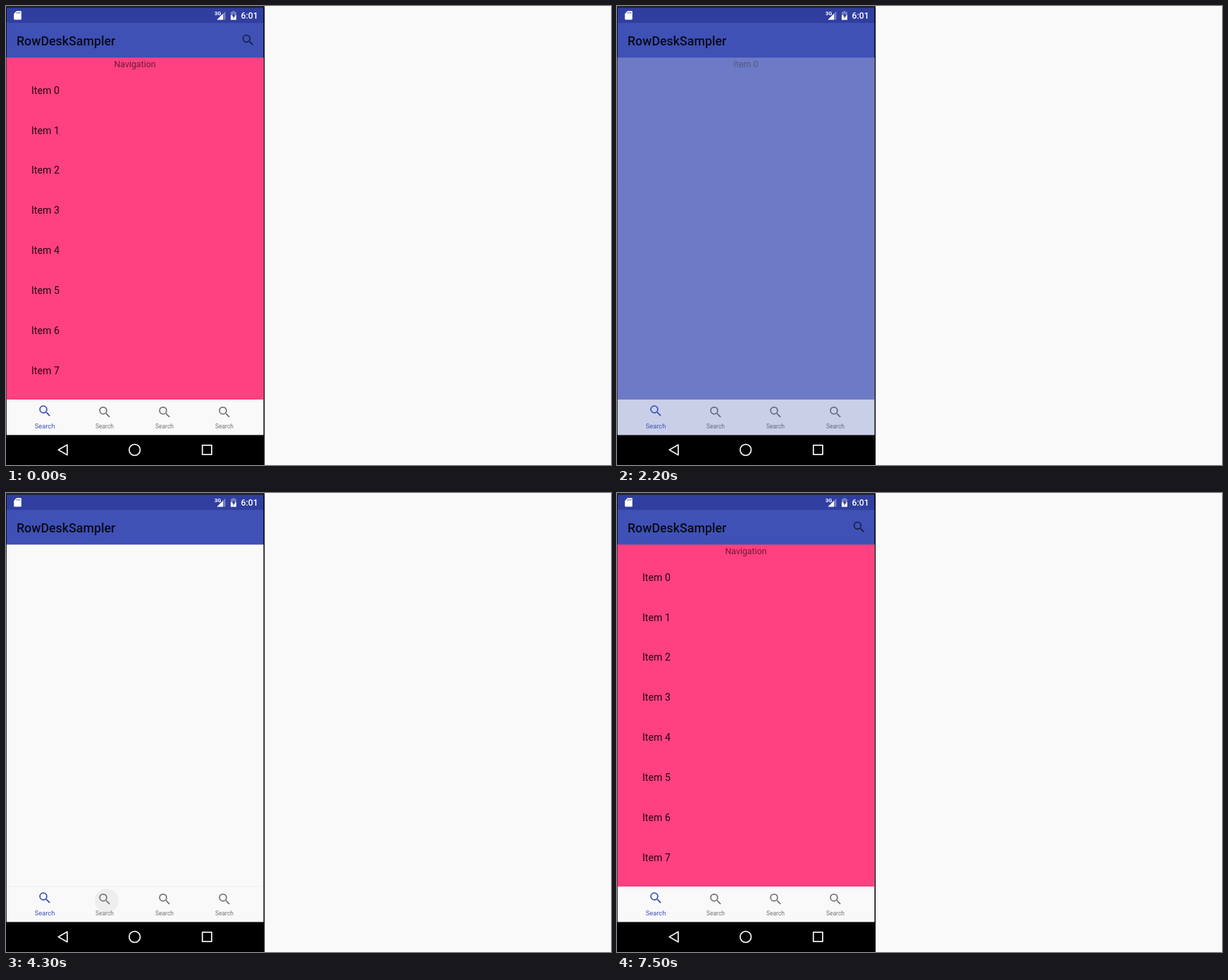
Recreate the animation shown at these times as an HTML page. Size 859x652 px, loop 8000 ms.

```html
<!DOCTYPE html>
<html lang="en">
<head>
<meta charset="utf-8">
<title>Two pane app</title>
<style>
  html, body { margin: 0; width: 100%; height: 100%; overflow: hidden; background: #f9f9f9; }
  svg { display: block; width: 859px; height: 652px; font-family: Roboto, sans-serif; }
  .mid { text-anchor: middle; }
  .item { font-size: 14.2px; fill: rgba(0, 0, 0, .87); }
  .small { font-size: 12.4px; fill: rgba(0, 0, 0, .58); }
  .tab { fill: #757575; font-size: 8.5px; }
  .tab.on { fill: #3f51b5; font-size: 9.3px; }
  .tab.on use { transform: translateY(-1.7px); }
</style>
</head>
<body>
<svg viewBox="0 0 859 652">
  <defs>
    <path id="lens" transform="scale(.888) translate(-11.75 -11.75)" d="M15.5 14h-.79l-.28-.27A6.47 6.47 0 0 0 16 9.5 6.5 6.5 0 1 0 9.5 16c1.61 0 3.09-.59 4.23-1.57l.27.28v.79l5 4.99L20.49 19zm-6 0a4.5 4.5 0 1 1 0-9 4.5 4.5 0 0 1 0 9z"/>
    <clipPath id="listClip"><rect x="1" y="91" width="364.6" height="468"/></clipPath>
    <clipPath id="tabsClip"><rect x="1" y="559" width="364.6" height="50"/></clipPath>
  </defs>

  <rect width="367.2" height="652"/>
  <rect width="367" height="2.5" fill="#252525"/>

  <!-- status bar -->
  <rect x=".8" y="2.5" width="364.8" height="21.5" fill="#303f9f"/>
  <g fill="#fff">
    <path d="M15 7h5.5q1.3 0 1.3 1.3v10q0 1.3-1.3 1.3h-8q-1.3 0-1.3-1.3V11z"/>
    <path d="M15.5 8.5v2.2M17.6 8.5v2.2M19.7 8.5v2.2" stroke="#303f9f" stroke-width=".9"/>
    <path d="M311.5 7.5v12h-12z" opacity=".35"/>
    <path d="M308 11v8.5h-8.5z"/>
    <text x="296" y="12.6" font-size="7.5" font-weight="700">3G</text>
    <path d="M321.5 7h3v1.4h2.5v11.2h-8V8.4h2.5z" opacity=".35"/>
    <path d="M319 13h8v6.6h-8z"/>
    <path d="M324 9.5l-3.2 4.9h1.8v3.6l3.2-4.9H324z" fill="#303f9f"/>
    <text x="333.5" y="18.2" font-size="12.4" font-weight="500">6:01</text>
  </g>

  <!-- list -->
  <rect x=".8" y="73" width="364.8" height="536.4" fill="#f9f9f9"/>
  <g id="page">
    <rect x=".8" y="73" width="364.8" height="486" fill="#ff4081"/>
    <text class="small mid" x="183" y="87">Navigation</text>
    <g clip-path="url(#listClip)">
      <rect id="press" x="1" y="91" width="365" height="57"/>
      <path id="glowTop" d="M1 91h365v17Q183 163 1 108z" fill="#3f51b5"/>
      <path id="glowEnd" d="M1 559h365v-12Q183 512 1 547z" fill="#3f51b5"/>
      <g id="list"></g>
    </g>
  </g>

  <!-- bottom tabs -->
  <rect x=".8" y="558.5" width="364.8" height="1" fill-opacity=".05"/>
  <g clip-path="url(#tabsClip)"><circle id="ripple" fill-opacity=".045"/></g>
  <g id="tabs"></g>

  <!-- detail pane -->
  <g id="detail">
    <rect x=".8" y="73" width="364.8" height="486" fill="#3f51b5"/>
    <text class="small mid" x="183" y="87">Item 0</text>
  </g>
  <rect id="shade" x=".8" y="559" width="364.8" height="50.4" fill="#3f51b5"/>

  <!-- toolbar -->
  <rect x=".8" y="24" width="364.8" height="49.3" fill="#3f51b5"/>
  <text x="15" y="55.5" font-size="17.8" font-weight="500" fill-opacity=".87">RowDeskSampler</text>
  <use id="toolIcon" href="#lens" transform="translate(343.5 48.3)" fill-opacity=".6"/>

  <g id="toast">
    <rect x="102.5" y="513" width="161" height="39" rx="19.5" fill="#555" fill-opacity=".9"/>
    <text class="mid" x="183" y="538" font-size="12.6" fill="#fff">Open not created yet</text>
  </g>

  <!-- system buttons -->
  <rect id="pill" x="41" y="609.5" width="79" height="42.5" rx="21" fill="#333"/>
  <g fill="none" stroke="#eee" stroke-width="1.8" stroke-linejoin="round">
    <path d="M74.3 630.5l12.6-7.3v14.6z"/>
    <circle cx="182.7" cy="630.5" r="7.8"/>
    <rect x="278.8" y="623.9" width="13.2" height="13.2"/>
  </g>
</svg>

<script>
const LOOP = 8000, STEP = 100;
const ROW = 56.83, TAB = 85;
const tapTimes = [4300, 5100, 6050, 7100];

const $ = id => document.getElementById(id);
const repeat = (n, make) => Array.from({ length: n }, (_, i) => make(i)).join('');
const tabX = i => 55 + TAB * i;

$('list').innerHTML = repeat(10, i => `<text class="item" x="36" y="${124.7 + i * ROW}">Item ${i}</text>`);
$('tabs').innerHTML = repeat(4, i =>
  `<g class="tab mid" transform="translate(${tabX(i)} 576.7)"><use href="#lens"/><text y="23.3">Search</text></g>`);
const tabs = [...$('tabs').children];

function set(id, attributes) {
  for (const name in attributes) $(id).setAttribute(name, attributes[name]);
}

function draw(t) {
  const ramp = (from, to) => Math.min(1, Math.max(0, (t - from) / (to - from)));
  const during = (from, to) => +(t >= from && t < to);
  const fade = (id, opacity) => set(id, { opacity });

  // Drag to the end of the list, then back past its start.
  const scroll = 100 * (ramp(400, 600) ** 2 - ramp(1000, 1300));
  set('list', { transform: `translate(0 ${-scroll})` });
  fade('glowEnd', .035 * during(600, 2000));
  fade('glowTop', during(1300, 2000) * (.12 - .075 * ramp(1300, 1400)));

  // Open the first item, then go back.
  const open = ramp(2000, 2400) - ramp(3200, 3600);
  fade('press', .1 * during(2000, 2100));
  fade('detail', 1 - (1 - open) ** 2);
  fade('shade', open ** 2);
  fade('pill', during(3200, 3700) * (1 - ramp(3300, 3700)));

  const listShown = 1 - during(2100, 3500) - during(4300, 6100);
  fade('page', listShown);
  fade('toolIcon', listShown);
  fade('toast', ramp(5000, 5600) - ramp(7000, 7500));

  // Each tap moves to the next tab once its ripple has grown.
  const selected = tapTimes.filter(tap => t >= tap + 50).length % tabs.length;
  tabs.forEach((tab, i) => tab.classList.toggle('on', i === selected));
  const last = tapTimes.findLastIndex(tap => tap <= t);
  const tap = tapTimes[last];
  const grow = ramp(tap, tap + 50);
  set('ripple', {
    cx: tabX((last + 1) % tabs.length) + 3 * (1 - grow),
    cy: 579 + 5 * grow,
    r: during(tap, tap + 150) && 17 + 30 * grow
  });
}

function tick() {
  const t = performance.now() % LOOP;
  draw(t - t % STEP);
  requestAnimationFrame(tick);
}
tick();
</script>
</body>
</html>
```
